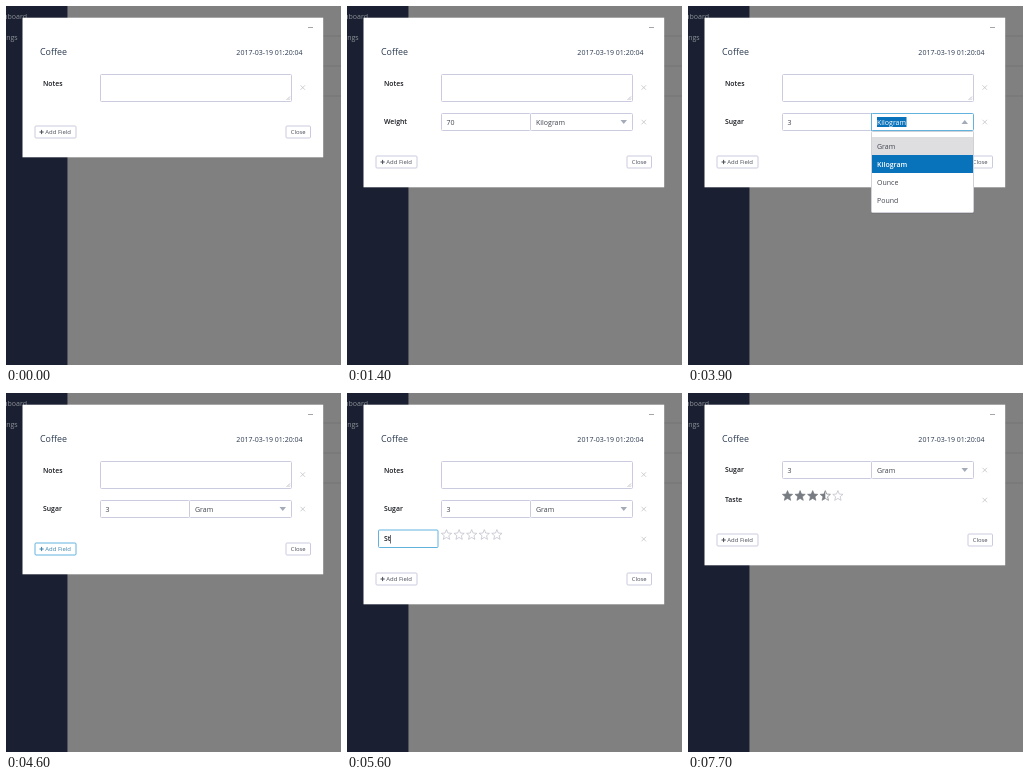
An HTML page with a canvas for the animation above (9700 ms loop, 335 by 359 pixels).

```html
<!DOCTYPE html>
<html lang="en">
<head>
<meta charset="utf-8">
<title>Editing record fields</title>
<style>
  html, body { margin: 0; width: 100%; height: 100%; overflow: hidden; background: #808080; }
  canvas { display: block; width: 335px; height: 359px; }
</style>
</head>
<body>
<canvas id="stage"></canvas>
<script>
const W = 335, H = 359, LOOP = 9700;
const canvas = document.getElementById('stage');
const ctx = canvas.getContext('2d');
const ratio = window.devicePixelRatio || 1;
canvas.width = W * ratio;
canvas.height = H * ratio;
ctx.scale(ratio, ratio);

const FONT = '"Open Sans", "Noto Sans", sans-serif';
const BORDER = '#cbcbdf', FOCUS = '#62b2de', BLUE = '#0872bb';
const INK = '#17191f', SOFT = '#41454e', NAVY = '#2b3a50', CROSS = '#c2c3c8';
const FIELDS = ['Distance', 'Duration', 'Intensity', 'Select', 'Stars', 'Switch', 'Text', 'Units', 'Weight'];
const UNITS = ['Gram', 'Kilogram', 'Ounce', 'Pound'];

function fill(x, y, w, h, color) {
  ctx.fillStyle = color;
  ctx.fillRect(x, y, w, h);
}

function box(x, y, w, h, border = BORDER, back = '#fff') {
  ctx.beginPath();
  ctx.roundRect(x + .5, y + .5, w - 1, h - 1, 1);
  ctx.fillStyle = back;
  ctx.fill();
  ctx.strokeStyle = border;
  ctx.lineWidth = 1;
  ctx.stroke();
}

// Text whose capitals are centred on cy.
function text(str, x, cy, { size = 7, weight = 400, color = SOFT, align = 'left' } = {}) {
  ctx.font = `${weight} ${size}px ${FONT}`;
  ctx.textAlign = align;
  ctx.fillStyle = color;
  ctx.fillText(str, x, cy + size * .36);
  return ctx.measureText(str).width;
}

function line(color, width, ...pts) {
  ctx.beginPath();
  for (let i = 0; i < pts.length; i += 2) ctx.lineTo(pts[i], pts[i + 1]);
  ctx.strokeStyle = color;
  ctx.lineWidth = width;
  ctx.stroke();
}

function cross(cy, color = CROSS) {
  line(color, .8, 294.5, cy - 2.2, 299, cy + 2.3);
  line(color, .8, 299, cy - 2.2, 294.5, cy + 2.3);
}

function caret(x, cy) {
  fill(Math.floor(x), cy - 4, 1, 8.5, '#6b6d72');
}

function triangle(cy, dir) {
  ctx.beginPath();
  ctx.moveTo(273.5, cy - 2 * dir);
  ctx.lineTo(280, cy - 2 * dir);
  ctx.lineTo(276.75, cy + 2 * dir);
  ctx.fillStyle = '#a3abb8';
  ctx.fill();
}

function starPath(cx, cy) {
  ctx.beginPath();
  for (let i = 0; i < 10; i++) {
    const r = i % 2 ? 2.4 : 5.4, a = i * Math.PI / 5 - Math.PI / 2;
    ctx.lineTo(cx + r * Math.cos(a), cy + r * Math.sin(a));
  }
  ctx.closePath();
}

function stars(cy, score) {
  for (let i = 0; i < 5; i++) {
    const cx = 99.5 + i * 12.6, part = Math.min(1, Math.max(0, score - i));
    starPath(cx, cy);
    ctx.strokeStyle = part ? '#777b82' : '#babac8';
    ctx.lineWidth = .7;
    ctx.stroke();
    ctx.save();
    ctx.beginPath();
    ctx.rect(cx - 6, cy - 6, 12 * part, 12);
    ctx.clip();
    starPath(cx, cy);
    ctx.fillStyle = '#777b82';
    ctx.fill();
    ctx.restore();
  }
}

// Hover, caret, one deletion per step, one letter per step, then done.
function rename(from, to, start, t) {
  const step = Math.floor((t - start) / 100);
  if (step < 0) return { str: from };
  const typed = step - 1 - from.length;
  if (typed > to.length) return { str: to };
  const str = typed > 0 ? to.slice(0, typed) : from.slice(0, from.length - Math.max(0, step - 1));
  return { str, open: true, caret: step > 0 };
}

function label(name, cy) {
  if (name.open) box(31, cy - 9.5, 60.5, 18.5, name.caret ? FOCUS : BORDER);
  const w = text(name.str, 37, cy, { size: 6.85, weight: 600, color: INK });
  if (name.caret) caret(37 + w, cy);
}

function backdrop() {
  fill(0, 0, W, H, '#808080');
  for (const y of [29.5, 59.5, 89.5]) fill(317, y, 18, 1, '#757575');
  fill(0, 0, 61, H, '#1a2031');
  fill(61, 0, 1, H, '#51545c');
  const dim = { color: '#8e9199', align: 'right' };
  text('Dashboard', 21, 10, dim);
  text('Settings', 11.7, 31.5, dim);
}

function modal(bottom) {
  fill(16.5, 11.7, 300.7, bottom - 11.4, '#fff');
  fill(302, 21, 5, 1, '#a3a5ab');
  text('Coffee', 34, 46, { size: 8.9, color: NAVY });
  text('2017-03-19 01:20:04', 296.6, 46.5, { size: 7.03, color: NAVY, align: 'right' });
}

function notes(leaving) {
  if (leaving) fill(29, 62, 276, 38, '#f1f1f3');
  text('Notes', 37, 77.5, { size: 6.85, weight: 600, color: INK });
  box(94, 68, 192, 28);
  line('#9a9aa4', .6, 280.5, 94, 284, 90.5);
  line('#9a9aa4', .6, 282.5, 94, 284, 92.5);
  cross(81.5, leaving ? '#5c5f66' : CROSS);
}

function amount(cy, t) {
  const editing = t >= 3200 && t < 3700, open = t >= 3700 && t < 4100;
  const value = t < 3400 ? '70' : t < 3500 ? '7' : t < 3600 ? '' : '3';
  label(rename('Weight', 'Sugar', 1900, t), cy);
  box(183, cy - 9, 103, 18, open ? FOCUS : BORDER);
  box(94, cy - 9, 90, 18, editing ? FOCUS : BORDER);
  if (open) fill(183, cy - 9, 1, 18, FOCUS);
  const w = text(value, 99.5, cy);
  if (editing) caret(99.5 + w, cy);
  if (open) fill(189, cy - 5, 29.5, 10, BLUE);
  text(t < 4100 ? 'Kilogram' : 'Gram', 189, cy, { color: open ? '#fff' : SOFT });
  triangle(cy, open ? -1 : 1);
  cross(cy);
}

function unitList(hover) {
  fill(183.5, 125.5, 102.5, 82, 'rgba(0,0,0,.15)');
  box(183, 125, 103, 82, '#d0d1d8');
  UNITS.forEach((unit, i) => {
    const cy = 140.5 + i * 18, on = i === 1;
    if (on) fill(184, cy - 9.5, 101, 18, BLUE);
    else if (i === 0 && hover) fill(184, cy - 9.5, 101, 18, '#dedee1');
    text(unit, 189, cy, { weight: on ? 600 : 400, color: on ? '#fff' : SOFT });
  });
}

function fieldMenu(top, active) {
  fill(9.5, top, 61.2, 178, 'rgba(0,0,0,.15)');
  box(9.5, top - .5, 61, 178, '#dadade');
  FIELDS.forEach((name, i) => {
    const cy = top + 12.5 + i * 19, on = name === active;
    if (on) fill(10, cy - 9.5, 60, 19, '#e3e3e6');
    text(name, 16, cy, { color: on ? '#5a5d64' : '#24262c' });
  });
}

function buttons(cy, focused, saved) {
  const color = focused ? '#3b83ab' : '#484c58';
  box(28.5, cy - 6.5, 42, 13, focused ? FOCUS : BORDER);
  line(color, 1, 33.5, cy, 37.7, cy);
  line(color, 1, 35.6, cy - 2.1, 35.6, cy + 2.1);
  text('Add Field', 39.3, cy, { size: 5.95, color });
  if (saved) text('Saved', 253, cy, { size: 5.8, color: '#555862' });
  box(279.5, cy - 6.5, 25.5, 13);
  text('Close', 292.2, cy, { size: 5.9, color: '#484c58', align: 'center' });
}

function draw(t) {
  const hasNotes = t < 7700, shift = hasNotes ? 0 : -39;
  const hasAmount = t >= 1400, hasStars = t >= 5100;
  const bar = 126 + 30 * hasAmount + 30 * hasStars + shift;
  const firstMenu = t >= 1000 && t < 1400, secondMenu = t >= 4700 && t < 5100;

  backdrop();
  modal(bar + 25);
  if (hasNotes) notes(t >= 7200);
  if (hasAmount) amount(116 + shift, t);
  if (hasStars) {
    const score = t < 6400 ? 0 : t < 6700 ? Math.floor((t - 6300) / 100) : 3.5;
    label(rename('Stars', 'Taste', 5200, t), 146 + shift);
    stars(142 + shift, score);
    cross(146 + shift);
  }
  buttons(bar, firstMenu || (t >= 4600 && t < 5100), t >= 6700 && t < 7200);
  if (firstMenu) fieldMenu(136, t >= 1200 ? 'Weight' : '');
  if (secondMenu) fieldMenu(166, t >= 4900 ? 'Stars' : '');
  if (t >= 3700 && t < 4100) unitList(t >= 3900);
}

const began = performance.now();
function tick() {
  draw((performance.now() - began) % LOOP);
  requestAnimationFrame(tick);
}
tick();
</script>
</body>
</html>
```
